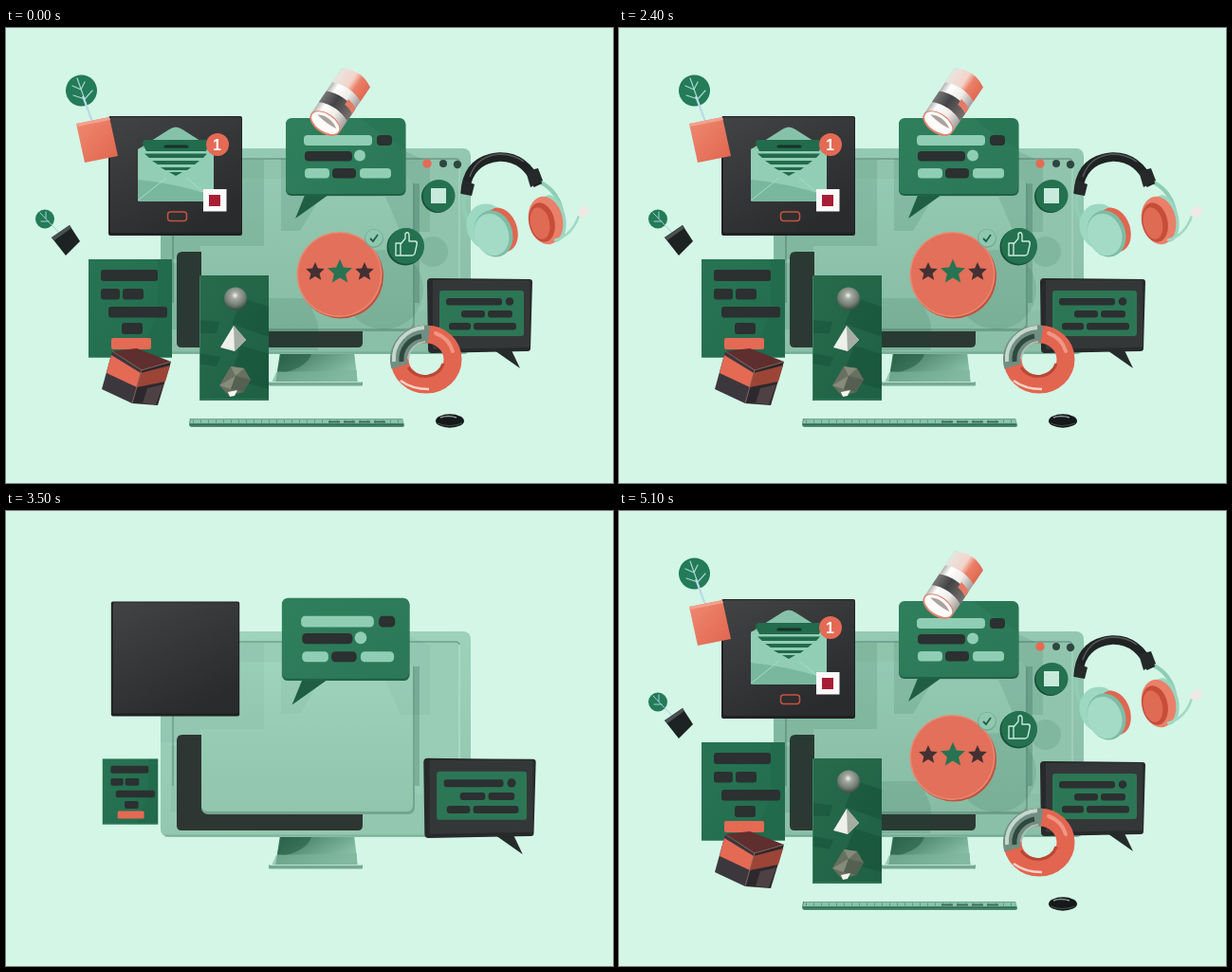
These frames come from a looping animation (640x480 px, 5200 ms). An HTML page:

```html
<!DOCTYPE html>
<html lang="en">
<head>
<meta charset="utf-8">
<title>Desk in mint</title>
<style>
html, body { margin: 0; width: 100%; height: 100%; overflow: hidden; background: #d3f6e7; }
svg { display: block; width: 100vw; height: 100vh; }
.dk { fill: #2b3030; }
.mint { fill: #8fceb4; }
.red { fill: #e46a54; }
.sh { fill: #0c4a34; opacity: .11; }
.ln { fill: none; stroke: #c8eadc; stroke-linecap: round; stroke-linejoin: round; }
</style>
</head>
<body>
<svg viewBox="0 0 640 480">
<defs>
  <linearGradient id="screen" x2=".2" y2="1"><stop stop-color="#a6dac4"/><stop offset="1" stop-color="#9acdb7"/></linearGradient>
  <linearGradient id="card" x2="0" y2="1"><stop stop-color="#a5d9c3"/><stop offset="1" stop-color="#97cab3"/></linearGradient>
  <linearGradient id="stand" x2="1" y2=".6"><stop stop-color="#2f6b51"/><stop offset=".45" stop-color="#5c957c"/><stop offset="1" stop-color="#8dc5ac"/></linearGradient>
  <linearGradient id="dark" x2=".6" y2="1"><stop stop-color="#424345"/><stop offset="1" stop-color="#2a2b2d"/></linearGradient>
  <linearGradient id="green" x2="1" y2="1"><stop stop-color="#2f7f5c"/><stop offset="1" stop-color="#2b7757"/></linearGradient>
  <linearGradient id="deep" x2="1" y2="1"><stop stop-color="#276b4b"/><stop offset="1" stop-color="#1f6044"/></linearGradient>
  <linearGradient id="coral" x2="1" y2="1"><stop stop-color="#f08a72"/><stop offset="1" stop-color="#e0654d"/></linearGradient>
  <linearGradient id="chrome"><stop stop-color="#b4b2ae"/><stop offset=".2" stop-color="#fff"/><stop offset=".6" stop-color="#f0eeea"/><stop offset="1" stop-color="#a39c9a"/></linearGradient>
  <linearGradient id="band"><stop stop-color="#777"/><stop offset=".4" stop-color="#434345"/><stop offset="1" stop-color="#77706e"/></linearGradient>
  <linearGradient id="cap"><stop stop-color="#e8e5e0"/><stop offset=".45" stop-color="#f3d4c9"/><stop offset=".65" stop-color="#ea8069"/><stop offset="1" stop-color="#e2694f"/></linearGradient>
  <radialGradient id="ball" cx=".48" cy=".36" r=".62"><stop stop-color="#f4f6ee"/><stop offset=".25" stop-color="#a5aba0"/><stop offset=".7" stop-color="#737e74"/><stop offset="1" stop-color="#3f4f45"/></radialGradient>
  <path id="star" d="M0-10 2.9-3.4 9.8-2.9 4.6 1.9 6.2 8.8 0 5-6.2 8.8-4.6 1.9-9.8-2.9-2.9-3.4Z"/>
  <clipPath id="body"><rect x="163" y="127" width="327" height="217" rx="8"/></clipPath>
</defs>

<!-- data-a: start, duration, peak scale, centre x, centre y -->
<g data-a="2512 695 1 326 252">
  <path d="M289 342H367L371 375H284Z" fill="url(#stand)"/>
  <path d="M290 344H322Q318 357 295 363L286 362Z" fill="#22583f" opacity=".55"/>
  <path d="M285 363 370 361V374H280Z" fill="#7db49c" opacity=".65"/>
  <rect x="277" y="373" width="99" height="4.5" rx="1" fill="#76a993"/>
  <path d="M278 373.500H375" stroke="#b5e2d0"/>
  <rect x="163" y="127" width="327" height="217" rx="8" fill="url(#screen)"/>
  <path d="M168 342.500H485" stroke="#83b7a1" stroke-width="2"/>
  <path d="M176 290V142Q176 138 180 138H474Q478 138 478 142V300" fill="#a0d3bd" stroke="#76a592" stroke-width="1.500"/>
  <path d="M478 141V325" stroke="#b0dfcb" stroke-width="2"/>
  <path d="M186 236H210V318H376V332Q376 337 371 337H185Q180 337 180 332V242Q180 236 186 236Z" fill="#303635"/>
  <path d="M424 164H436V290H424Z" fill="#82b5a0"/>
  <rect x="206" y="161" width="225" height="159" rx="7" fill="#78aa95"/>
  <rect x="206" y="159" width="223" height="158" rx="6" fill="url(#card)"/>
</g>

<g data-f="3250 650" clip-path="url(#body)">
  <path d="M163 127H490V344H163Z" class="sh"/>
  <path d="M240 139H272V230H205V244H163V210H240Z" class="sh"/>
  <path d="M421 130 447 142V215H416L400 178H332L310 214H290V138Z" class="sh"/>
  <path d="M174 248H186V318H174Z" class="sh"/>
</g>
<g data-f="3900 400" clip-path="url(#body)">
  <path d="M270 285H318L329 312V340H270Z" class="sh"/>
  <circle cx="450" cy="236" r="16" class="sh"/>
  <path d="M305 344Q320 365 370 359V344Z" fill="#194f39" opacity=".35"/>
</g>

<g data-a="3500 300 1.1 444 143"><circle cx="444" cy="143" r="4.700" class="red"/></g>
<g data-a="3650 300 1.1 461 143"><circle cx="461" cy="143" r="4" fill="#2e4841"/></g>
<g data-a="3900 300 1.1 476 144"><circle cx="476" cy="144" r="4.200" fill="#2e4841"/></g>

<!-- mail window -->
<g data-a="3200 450 1.08 179 156">
  <rect x="108" y="93" width="141" height="126" rx="2" fill="#202122"/>
  <rect x="110" y="94" width="138" height="122" rx="2" fill="url(#dark)"/>
</g>
<g data-a="3840 450 1 188.6 157">
  <path d="M139 128 172 107Q179 102 186 107L219 128Z" fill="#86c2aa"/>
  <rect x="139" y="127" width="80" height="56" rx="2" fill="#92ceb5"/>
  <path d="M148 118H210Q214 118 214 122L211 130H148L144 122Q144 118 148 118ZM146 132.500H212L208 137H151ZM154 140H204L199 144H160ZM163 147H195L191 150H168ZM172 152H186L179 156Z" fill="#226b4c"/>
  <path d="M168 125H191" stroke="#18332a" stroke-width="3" stroke-linecap="round"/>
  <path d="M139 160Q175 163 219 177V183H139Z" fill="#5b9b82" opacity=".45"/>
  <path d="M139 182 169 158M219 182 190 158" stroke="#a9dcc7" fill="none"/>
  <circle cx="223" cy="123" r="12" class="red"/>
  <text x="222.500" y="128.500" font-family="Liberation Sans, Arial, sans-serif" font-size="16" font-weight="700" fill="#fff" text-anchor="middle">1</text>
</g>
<g data-a="3900 390 1 180 198"><rect x="170.500" y="194" width="20" height="9.500" rx="3" fill="none" stroke="#c25440" stroke-width="1.500"/></g>
<g data-a="3550 350 1.15 220 181.500">
  <rect x="208" y="170" width="24.500" height="23.500" fill="#fafafa"/>
  <rect x="214" y="176" width="12" height="12" fill="#a91d34"/>
</g>

<!-- list -->
<g data-a="3350 400 1.09 131 296">
  <rect x="87" y="244" width="88" height="104" fill="url(#green)"/>
  <rect x="87" y="244" width="88" height="104" fill="#0d4a33" opacity=".22"/>
  <path d="M160 244H175V348H140L160 300Z" class="sh"/>
  <path d="M87 347.500H175" stroke="#4c967a"/>
  <g class="dk">
    <rect x="100" y="255" width="60" height="12" rx="3"/>
    <rect x="100" y="275" width="20" height="11.500" rx="3"/>
    <rect x="123" y="275" width="22" height="11.500" rx="3"/>
    <rect x="108" y="294" width="62" height="11.500" rx="3"/>
    <rect x="122" y="311" width="22" height="12" rx="3"/>
  </g>
  <rect x="111" y="327" width="42" height="12" rx="2" class="red"/>
</g>
<g data-a="3650 520 1.05 130 383">
  <path d="M112 341 138 338 174 352 143 361Z" fill="#5e2f2e"/>
  <path d="M112 341 143 361 133 396 101 381Z" fill="#3c373d"/>
  <path d="M143 361 174 352 160 398 133 396Z" fill="#2d282d"/>
  <path d="M111 345 142 364 138 379 106 364Z" class="red"/>
  <path d="M142 364 173 356 168 373 138 379Z" fill="#9c4537"/>
  <path d="M149 380 166 376 158 397 144 396Z" fill="#8c6f6c" opacity=".35"/>
  <path d="M112 341 143 361 133 396M143 361 174 352" stroke="#8d6259" fill="none" stroke-width=".8"/>
</g>

<!-- rating -->
<g data-a="3870 450 1 407 274" clip-path="url(#body)"><circle cx="398" cy="276" r="42" class="sh"/></g>
<g data-a="3870 450 1 352 260">
  <ellipse cx="353" cy="262" rx="45" ry="44.500" fill="#c0513e"/>
  <circle cx="351.500" cy="260" r="45" fill="#ea8871"/>
  <circle cx="351.500" cy="260" r="43.500" fill="#e2705a"/>
  <g fill="#443033"><use href="#star" transform="translate(326 257)"/><use href="#star" transform="translate(378 257)"/></g>
  <use href="#star" transform="translate(352 257) scale(1.320)" fill="#287352"/>
</g>
<g data-a="3900 700 1 422 230">
  <circle cx="421" cy="231" r="19.500" fill="#174e38"/>
  <circle cx="422" cy="230" r="19" fill="#24714f"/>
  <path d="M411 227H416V240H411ZM416 228 421 222V217Q424 214 425 218V225H432Q434 226 433 229L431 238Q430 240 428 240H416" class="ln" stroke-width="1.400"/>
</g>
<g data-a="3900 450 1 388 222">
  <circle cx="388" cy="222" r="10" fill="#71aa94"/>
  <circle cx="388" cy="221.500" r="9" fill="#8ec8b0"/>
  <path d="M384 222 387 225 392 218" fill="none" stroke="#245d48" stroke-width="1.800"/>
</g>
<g data-a="3900 390 1 456 177">
  <circle cx="455" cy="178" r="17" fill="#174e38"/>
  <circle cx="456.500" cy="177" r="17" fill="#24714f"/>
  <rect x="448" y="169" width="16" height="16" fill="#c8eadc"/>
</g>

<!-- chat bubbles -->
<g data-a="3000 411 1.1 358 146">
  <path d="M316 174 305 201 340 176Z" fill="#205e44"/>
  <rect x="295" y="96" width="126.500" height="81" rx="6" fill="#1f6346"/>
  <rect x="295" y="95" width="126" height="80" rx="6" fill="url(#green)"/>
  <g class="mint">
    <rect x="314" y="113" width="72" height="11" rx="4"/>
    <circle cx="373" cy="134.500" r="6"/>
    <rect x="315" y="148" width="26" height="10.500" rx="4"/>
    <rect x="373" y="148" width="33" height="10.500" rx="4"/>
  </g>
  <g class="dk">
    <rect x="391" y="113" width="16" height="11" rx="4"/>
    <rect x="315" y="130" width="50" height="10.500" rx="4"/>
    <rect x="344" y="148" width="25" height="10.500" rx="4"/>
  </g>
</g>
<g data-f="3700 500"><path d="M374 95H415Q421 95 421 101V128L386 105Z" class="sh"/></g>
<g data-a="3020 415 1.09 500 312">
  <path d="M512 338 542 359 532 338Z" fill="#252b2a"/>
  <path d="M448 264 552 265Q555 265 555 268L553 338Q553 341 550 341L449 343Q445 343 445 339L444 268Q444 264 448 264Z" fill="#27292a"/>
  <path d="M450 266H552V337L450 339Z" fill="#343738"/>
  <rect x="457" y="277" width="89" height="48" rx="3" fill="#2c7656"/>
  <g class="dk">
    <rect x="464" y="285" width="59" height="7.500" rx="3"/>
    <circle cx="531" cy="288.500" r="4.300"/>
    <rect x="480" y="298" width="25" height="7.500" rx="3"/>
    <rect x="508" y="298" width="26" height="7.500" rx="3"/>
    <rect x="467" y="311" width="23" height="7.500" rx="3"/>
    <rect x="493" y="311" width="45" height="7.500" rx="3"/>
  </g>
</g>

<!-- cup -->
<g data-a="3650 520 1.05 326 98">
  <g transform="translate(351 79) rotate(34)">
    <path d="M-18-32Q0-43 18-32V25Q0 42-18 25Z" fill="url(#chrome)"/>
    <path d="M-18-32Q0-43 18-32V-14Q0-22-18-14Z" fill="url(#cap)"/>
    <path d="M-18-3Q0-11 18-3V11Q0 3-18 11Z" fill="url(#band)"/>
    <path d="M6-9Q13-8 18-5V2Q12-2 6-2Z" fill="#e27b65"/>
    <ellipse cy="26" rx="18" ry="10.500" fill="#e2816e"/>
    <ellipse cy="25.500" rx="16.500" ry="9" fill="#fdfcfa"/>
    <path d="M-12 23Q0 16 13 24Q2 26-12 23Z" fill="#a9a29e"/>
  </g>
</g>

<!-- headphones -->
<g data-a="3590 470 1.07 548 186">
  <path d="M483 174Q480 192 488 204M557 160Q580 168 586 192" fill="none" stroke="#8fcdb5" stroke-width="4"/>
  <path d="M484 175Q486 139 520 136Q547 135 561 166" fill="none" stroke="#202323" stroke-width="9.500"/>
  <path d="M489 157Q496 135 520 133Q535 133 546 141" fill="none" stroke="#55595a" stroke-width="1.500"/>
  <path d="M548 151 561 148 566 161 553 168Z" fill="#262929"/>
  <path d="M480 175 491 177 494 165 482 160Z" fill="#262929"/>
  <ellipse cx="576" cy="201" rx="14" ry="25" transform="rotate(-12 576 201)" fill="#9ad6c0"/>
  <ellipse cx="569" cy="203" rx="18" ry="25.500" transform="rotate(-12 569 203)" fill="#ea8069"/>
  <ellipse cx="565" cy="205" rx="13.500" ry="21" transform="rotate(-12 565 205)" fill="#c64d3a"/>
  <ellipse cx="563" cy="206" rx="10" ry="17" transform="rotate(-12 563 206)" fill="#df6b55"/>
  <ellipse cx="508" cy="210" rx="22" ry="25" transform="rotate(-25 508 210)" fill="#9dd8c3"/>
  <ellipse cx="522" cy="213" rx="17" ry="24" transform="rotate(-18 522 213)" fill="#de6750"/>
  <ellipse cx="514" cy="217" rx="20" ry="25" transform="rotate(-18 514 217)" fill="#7dbca4"/>
  <ellipse cx="512" cy="218" rx="18" ry="22.500" transform="rotate(-18 512 218)" fill="#a3dbc6"/>
  <path d="M578 224Q597 219 604 198" fill="none" stroke="#a3d9c4" stroke-width="2.500"/>
  <ellipse cx="609" cy="194" rx="7" ry="5" transform="rotate(-40 609 194)" fill="#efe9e5"/>
</g>

<!-- ring -->
<g data-a="3650 520 1.05 441 347" fill="none">
  <ellipse cx="443" cy="349.500" rx="28" ry="26.500" stroke="#e2654f" stroke-width="19"/>
  <path d="M415 357A28 27 0 0 1 446 323" stroke="#718e82" stroke-width="18"/>
  <path d="M409 352A34 33 0 0 1 441 316" stroke="#c3d8cf" stroke-width="4"/>
  <path d="M417 352A26 25 0 0 1 438 325" stroke="#31483f" stroke-width="5"/>
  <path d="M424 349A20 20 0 0 1 442 331" stroke="#a7c4b8" stroke-width="2"/>
  <path d="M453 322A29 29 0 0 1 471 341" stroke="#f09683" stroke-width="4" stroke-linecap="round"/>
  <path d="M424 358A20 18 0 0 0 461 354" stroke="#b84835" stroke-width="3"/>
  <path d="M416 372Q428 381 446 381" stroke="#f9d2c8" stroke-width="2.500"/>
</g>

<!-- solids -->
<g data-a="3680 600 1 240.500 327">
  <rect x="204" y="261" width="73" height="132" fill="url(#deep)"/>
  <path d="M204 308 225 310 222 322H204ZM204 343 226 347 222 357 204 354ZM250 285 277 294V326L238 312ZM248 335 277 344V381L235 369Z" fill="#0f4530" opacity=".35"/>
  <path d="M204.500 262V392H277" fill="none" stroke="#3a8463"/>
  <circle cx="242" cy="285.500" r="12" fill="url(#ball)"/>
  <path d="M240 314 226 337 241 341 253 329Z" fill="#eef0ea"/>
  <path d="M240 314 253 329 241 341Z" fill="#a6ada2"/>
  <path d="M237 357 251 359 258 371 250 384 235 388 225 377Z" fill="#68705f"/>
  <path d="M237 357 251 359 242 367ZM225 377 242 367 237 381Z" fill="#868b7a"/>
  <path d="M242 367 258 371 250 384 237 381Z" fill="#566052"/>
  <path d="M234 384 244 382 241 388 236 389Z" fill="#f3f4ee"/>
</g>

<g data-a="3600 575 1 306 417">
  <path d="M194 412H418L420 419Q420 421 417 421H196Q193 421 193 418Z" fill="#4f8c73"/>
  <path d="M195 412.500H418L419 417H194Z" fill="#8ac3ab"/>
  <path d="M197 415H416" stroke="#5a987f" stroke-width="3" stroke-dasharray="1 7"/>
  <path d="M340 415.500H404" stroke="#416f5d" stroke-width="2" stroke-dasharray="12 4"/>
  <path d="M194 418.500H419" stroke="#2f6e53" stroke-width="1.500"/>
</g>
<g data-a="4020 700 1 468 415">
  <ellipse cx="468" cy="414.500" rx="15" ry="7.200" fill="#151919"/>
  <path d="M458 411Q466 408 475 411" fill="none" stroke="#899794" stroke-width="1.500"/>
  <path d="M455 417Q467 422 481 417" fill="none" stroke="#42504c"/>
</g>

<!-- plants -->
<g data-a="4160 700 1 91.500 96">
  <circle cx="79.500" cy="66" r="16.500" fill="#237b57"/>
  <path d="M75 53 91 98M79 65 70 61M79 65 83 57M83 75 71 71M83 75 91 66" class="ln" style="stroke:#a9d6d5" stroke-width="1.200"/>
  <path d="M90 97 81 72" stroke="#bedbe8" stroke-width="2"/>
  <path d="M74 101 109 94 118 135 83 142Z" fill="url(#coral)"/>
  <path d="M74 101 109 94 110 97 75 104Z" fill="#f2a18c"/>
</g>
<g data-a="3570 330 1.05 55 216">
  <circle cx="41" cy="201.500" r="10" fill="#237b57"/>
  <path d="M36 195 56 216M42 201V194M45 204H37" class="ln" style="stroke:#a5cfdb" stroke-width="1"/>
  <path d="M48 221 67 208 78 225 63 240Z" fill="#1d2222"/>
  <path d="M48 221 67 208 69 211 51 224Z" fill="#4a5150"/>
</g>
</svg>
<script>
const LOOP = 5200, STEP = 100, CUT = 2500, SETTLE = 250;
const clamp = v => Math.min(1, Math.max(0, v));
const read = key => [...document.querySelectorAll(`[data-${key}]`)]
  .map(el => [el, ...el.dataset[key].split(' ').map(Number)]);
const pops = read('a'), fades = read('f');

// Ease out to the peak, then relax to full size.
function size(t, start, span, peak) {
  if (t < CUT) return 1;
  const rest = 1 - clamp((t - start) / span);
  const extra = (peak - 1) * (1 - clamp((t - start - span) / SETTLE));
  return (1 - rest * rest) * (1 + extra);
}

function draw(now) {
  const t = Math.floor(now / STEP) * STEP % LOOP;
  for (const [el, start, span, peak, x, y] of pops) {
    const s = size(t, start, span, peak);
    el.setAttribute('display', s > 0 ? 'inline' : 'none');
    el.setAttribute('transform', `translate(${x} ${y}) scale(${s}) translate(${-x} ${-y})`);
  }
  for (const [el, start, span] of fades)
    el.setAttribute('opacity', t < CUT ? 1 : clamp((t - start) / span));
}

const begin = performance.now();
function tick() {
  draw(performance.now() - begin);
  requestAnimationFrame(tick);
}
tick();
</script>
</body>
</html>
```
